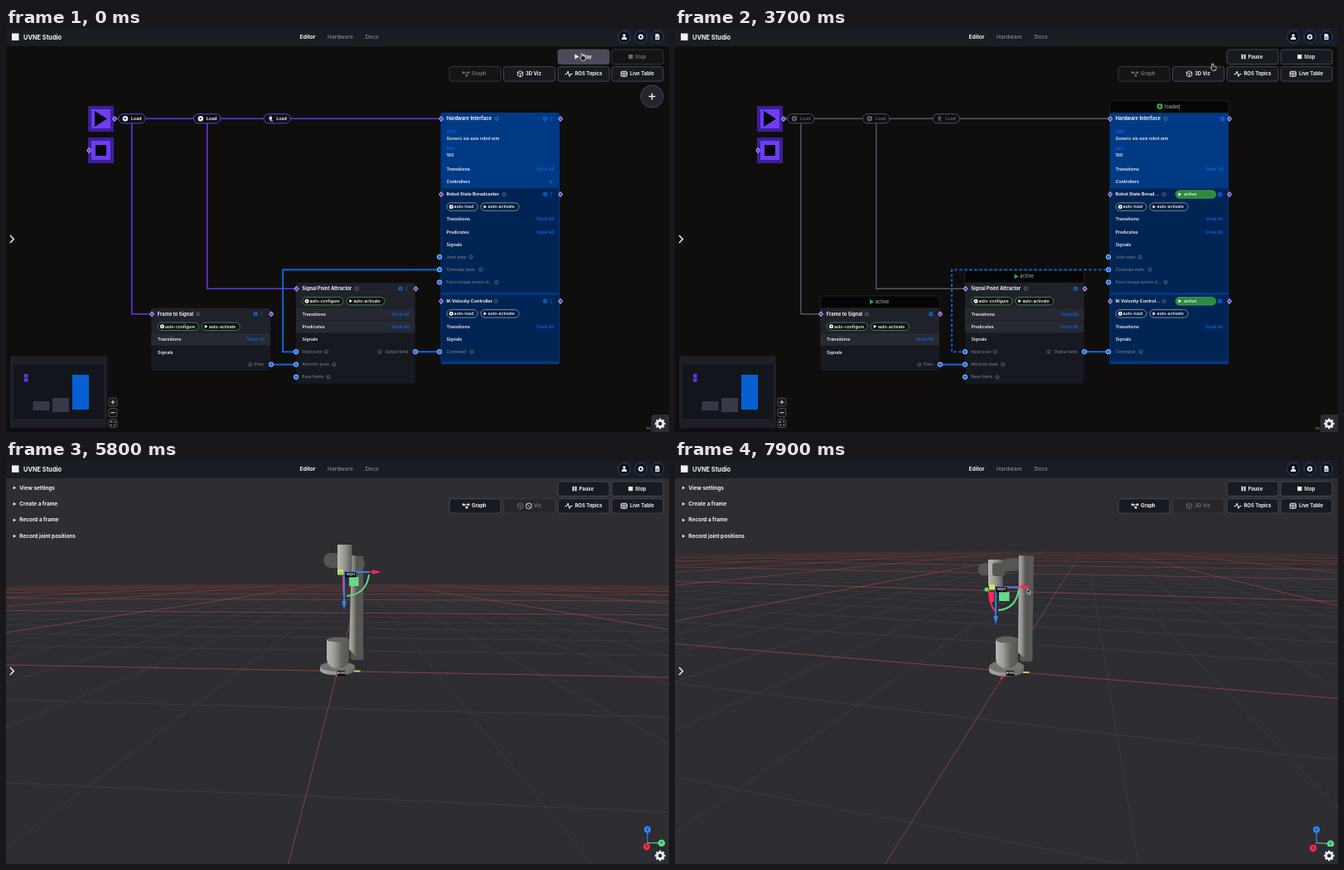
Recreate the animation shown at these times as an HTML page with a canvas. Size 800 by 487 pixels, loop 8000 ms.

```html
<!DOCTYPE html>
<html lang="en">
<head>
<meta charset="utf-8">
<title>Robot editor</title>
<style>
html, body { margin: 0; width: 100%; height: 100%; overflow: hidden; background: #0e0e0e; }
canvas { display: block; width: 100vw; height: 100vh; }
</style>
</head>
<body>
<canvas id="stage"></canvas>
<script>
const W = 800, H = 487, LOOP = 8000;
const canvas = document.getElementById('stage');
const c = canvas.getContext('2d');
const scale = window.devicePixelRatio || 1;
canvas.width = W * scale;
canvas.height = H * scale;

const WHITE = '#f2f2f4', GREY = '#777b85', BLUE = '#0a70f5', LINK = '#0665ea', PURPLE = '#6236ec', GREEN = '#35a047';
const HOVER = '#4b4b58', BUTTON = '#171a20', BORDER = '#4b4e57';

const clamp = v => Math.max(0, Math.min(1, v));
const span = (t, a, b) => clamp((t - a) / (b - a));
const smooth = v => v * v * (3 - 2 * v);
const lerp = (a, b, u) => a + (b - a) * u;

function text(s, x, y, size, color = WHITE, align = 'left', weight = 600) {
  c.font = `${weight} ${size}px Inter, sans-serif`;
  c.textAlign = align;
  c.fillStyle = color;
  c.fillText(s, x, y + size * 0.36);
}
function paint(fill, stroke, width = 1) {
  if (fill) { c.fillStyle = fill; c.fill(); }
  if (stroke) { c.strokeStyle = stroke; c.lineWidth = width; c.stroke(); }
}
function box(x0, y0, x1, y1, r, fill, stroke, width) {
  c.beginPath();
  c.roundRect(x0, y0, x1 - x0, y1 - y0, r);
  paint(fill, stroke, width);
}
function disc(x, y, r, fill, stroke, width) {
  c.beginPath();
  c.arc(x, y, r, 0, 7);
  paint(fill, stroke, width);
}
function trace(points) {
  c.beginPath();
  points.forEach(p => c.lineTo(p[0], p[1]));
}
function line(points, color, width = 1) {
  trace(points);
  paint(null, color, width);
}
function poly(points, fill, stroke, width) {
  trace(points);
  c.closePath();
  paint(fill, stroke, width);
}
const play = (x, y, r, color) => poly([[x - r * .7, y - r], [x + r, y], [x - r * .7, y + r]], color);

function gear(x, y, r, color) {
  disc(x, y, r * .58, null, color, r * .42);
  for (let i = 0; i < 8; i++) {
    const a = i * Math.PI / 4, p = Math.cos(a), q = Math.sin(a);
    line([[x + p * r * .7, y + q * r * .7], [x + p * r, y + q * r]], color, r * .38);
  }
}
function info(x, y) {
  disc(x, y, 2.1, null, '#858993', .6);
  line([[x, y - .4], [x, y + 1.2]], '#858993', .6);
}
function diamond(x, y) {
  poly([[x - 2.3, y], [x, y - 3], [x + 2.6, y], [x, y + 3]], PURPLE, WHITE, .8);
}
function port(x, y) {
  disc(x, y, 2.7, BLUE, '#cfe2ff', .8);
}

/* ---------- top bar and buttons ---------- */

function topBar() {
  box(0, 0, W, 22, 0, '#191d23');
  box(7, 6.5, 15.5, 15, 0, WHITE);
  text('UVNE Studio', 21, 11, 7.4, WHITE, 'left', 700);
  text('Editor', 354.5, 10.5, 6.6, WHITE, 'left', 700);
  text('Hardware', 388, 10.5, 6.6, GREY);
  text('Docs', 433.5, 10.5, 6.6, GREY);
  for (const x of [746, 766, 786]) disc(x, 10.7, 7.2, '#0d1017', '#164a93', 1);
  disc(746, 9, 1.7, WHITE);
  c.beginPath();
  c.arc(746, 14, 3.2, Math.PI, 0);
  paint(WHITE);
  gear(766, 10.7, 3.5, WHITE);
  poly([[783.5, 7], [786.8, 7], [788.5, 8.8], [788.5, 14.3], [783.5, 14.3]], WHITE);
  line([[784.6, 11], [787.4, 11]], '#10131a', .7);
  line([[784.6, 12.7], [787.4, 12.7]], '#10131a', .7);
}

const icons = {
  play: (x, y, k) => play(x, y, 3, k),
  pause: (x, y, k) => { box(x - 2.5, y - 2.8, x - .6, y + 2.8, 0, k); box(x + .6, y - 2.8, x + 2.5, y + 2.8, 0, k); },
  stop: (x, y, k) => box(x - 2.6, y - 2.6, x + 2.6, y + 2.6, 0, k),
  graph: (x, y, k) => {
    line([[x - 2.5, y - 1.5], [x + 2.5, y - 1.5]], k, .8);
    line([[x - 2, y - 1], [x + .8, y + 2]], k, .8);
    for (const [a, b] of [[-3, -1.5], [3, -1.5], [1, 2]]) box(x + a - 1.3, y + b - 1.3, x + a + 1.3, y + b + 1.3, .4, k);
  },
  cube: (x, y, k) => {
    poly([[x, y - 3.6], [x + 3.2, y - 1.9], [x + 3.2, y + 1.9], [x, y + 3.6], [x - 3.2, y + 1.9], [x - 3.2, y - 1.9]], null, k, .9);
    line([[x - 3.2, y - 1.9], [x, y - .2], [x + 3.2, y - 1.9]], k, .8);
    line([[x, y - .2], [x, y + 3.6]], k, .8);
  },
  wave: (x, y, k) => line([[x - 4.5, y + .3], [x - 2.3, y + .3], [x - .9, y - 3.2], [x + .9, y + 3.2], [x + 2, y + .3], [x + 4.5, y + .3]], k, 1),
  table: (x, y, k) => {
    box(x - 3.5, y - 3, x + 3.5, y + 3, .6, null, k, 1);
    line([[x - 3.5, y - 1], [x + 3.5, y - 1]], k, 1);
    line([[x - 3.5, y + 1], [x + 3.5, y + 1]], k, .7);
    line([[x, y - 1], [x, y + 3]], k, .8);
  }
};
function button(x, y, icon, iconX, label, labelX, off, hover) {
  const color = off ? '#6b6d74' : WHITE;
  box(x, y, x + 62, y + 17.5, 3, hover ? HOVER : off ? 'rgba(28,29,34,.4)' : BUTTON, off ? '#393b41' : BORDER, .9);
  icons[icon](iconX, y + 8.6, color);
  text(label, labelX, y + 8.6, 5.9, color, 'left', 700);
}
function buttons(running, viz, hover) {
  if (running) button(666, 26, 'pause', 686, 'Pause', 691.5, false, hover === 'play');
  else button(666, 26, 'play', 688.5, 'Play', 694.5, false, hover === 'play');
  button(731, 26, 'stop', 753.7, 'Stop', 759, !running);
  button(535, 46.7, 'graph', 555, 'Graph', 562, !viz);
  button(600.5, 46.7, 'cube', 620.5, '3D Viz', 627, viz, hover === 'viz');
  button(666, 46.7, 'wave', 679, 'ROS Topics', 686.5);
  button(731, 46.7, 'table', 745.7, 'Live Table', 753);
}
function corners() {
  line([[5, 250], [9.3, 254.5], [5, 259]], WHITE, 1.5);
  box(778.5, 466, 801, 488, [4, 0, 0, 0], '#2b2c34');
  gear(789.3, 477, 6.3, WHITE);
}

/* ---------- node graph ---------- */

function loadPill(x, plug, dim) {
  const color = dim ? '#5c5e69' : WHITE;
  box(x, 103.6, x + 32.3, 114.8, 5.6, '#0e0f15', dim ? '#50525e' : '#5f3ed2', 1);
  if (plug) {
    box(x + 6.5, 107.4, x + 10, 110.6, 1, color);
    line([[x + 7.3, 105.8], [x + 7.3, 108]], color, .7);
    line([[x + 9.3, 105.8], [x + 9.3, 108]], color, .7);
    line([[x + 8.2, 110], [x + 8.2, 112], [x + 11, 112]], color, .9);
  } else {
    disc(x + 8.2, 109.2, 3.2, color);
    play(x + 8.2, 109.2, 1.4, '#0e0f15');
  }
  text('Load', x + 15.3, 109.2, 5.2, color, 'left', 700);
}
function autoPill(x, y, width, label, edge, fill) {
  box(x, y - 4.7, x + width, y + 4.7, 4.7, fill, edge, .9);
  if (label === 'auto-activate') play(x + 5, y, 2.1, WHITE);
  else { disc(x + 5.2, y, 2.5, WHITE); disc(x + 5.2, y, .8, fill); }
  text(label, x + 8.6, y, 5, WHITE, 'left', 600);
}
function row(x, right, y, label, link = true) {
  text(label, x, y, 5.3);
  if (link) text('Show All', right, y, 5, LINK, 'right');
}
function signal(x, y, label, infoX) {
  text(label, x, y, 4.8, GREY, 'left', 500);
  info(infoX, y);
}
function tools(right, y, running) {
  if (running) return gear(right, y, 2.8, BLUE);
  gear(right - 7.5, y, 2.8, BLUE);
  for (const d of [-2, 0, 2]) disc(right, y + d, .65, BLUE);
}
function status(x, y, label) {
  box(x, y, x + 143.7, y + 15, [4, 4, 0, 0], '#050507', '#25262c', .8);
  const loaded = label === 'loaded', mid = x + 71.8, cy = y + 7.2;
  if (loaded) { disc(mid - 11.3, cy, 3.6, GREEN); play(mid - 11.2, cy, 1.5, '#050507'); }
  else play(mid - 10, cy, 3, GREEN);
  text(label, mid - 5.3, cy, 5.7, '#a0a2a8', 'left', 500);
}
function nodeCard(x, y, bottom, title, infoX, rows, running) {
  box(x, y, x + 143.7, bottom, running ? [0, 0, 3, 3] : 3, '#171920');
  box(x, y, x + 143.7, y + 30, running ? 0 : [3, 3, 0, 0], '#20222a');
  rows.forEach((label, i) => {
    box(x, y + 30.3 + i * 15.2, x + 143.7, y + 45 + i * 15.2, 0, '#272932');
    row(x + 7.7, x + 136.5, y + 37.6 + i * 15.2, label);
  });
  text(title, x + 7.5, y + 7, 5.75, WHITE, 'left', 700);
  info(infoX, y + 7);
  tools(x + 133.5, y + 7, running);
  autoPill(x + 8, y + 22, 49, 'auto-configure', '#3f8f48', '#0d1014');
  autoPill(x + 61, y + 22, 46, 'auto-activate', '#3f8f48', '#0d1014');
  row(x + 7.7, 0, y + 37.6 + rows.length * 15.2, 'Signals', false);
  if (running) status(x, y - 15, 'active');
}
function controller(y, bottom, title, short, infoX, running) {
  box(525.5, y - 7.5, 667, bottom, 0, '#002555');
  text(running ? short : title, 531.5, y, 5.35, WHITE, 'left', 700);
  info(running ? 590 : infoX, y);
  tools(running ? 657.5 : 658, y, running);
  if (running) {
    box(604, y - 4.8, 652.5, y + 4.8, 4.8, '#2a8b3c', '#59b567', .6);
    play(609, y, 2.3, WHITE);
    text('active', 614, y, 5.2);
  }
  autoPill(532, y + 15, 37, 'auto-load', '#82a0a8', '#001a40');
  autoPill(573, y + 15, 46, 'auto-activate', '#82a0a8', '#001a40');
}
function hardware(running) {
  box(524.5, 102, 668, 405.3, running ? 0 : 3, '#003a85');
  text('Hardware Interface', 531.5, 109.4, 5.8, WHITE, 'left', 700);
  info(592, 109.4);
  tools(running ? 660.5 : 658, 109.4, running);
  text('URDF', 531.5, 125.5, 4.7, LINK);
  text('Generic six-axis robot arm', 531.5, 132.7, 5);
  text('Rate', 531.5, 145.5, 4.7, LINK);
  text('100', 531.5, 152.7, 5);
  row(531.5, 661, 169.8, 'Transitions');
  row(531.5, 0, 185.2, 'Controllers', false);
  if (!running) {
    line([[654.7, 185.2], [660, 185.2]], LINK, .9);
    line([[657.3, 182.5], [657.3, 188]], LINK, .9);
  }
  controller(200.5, 319, 'Robot State Broadcaster', 'Robot State Broad...', 601, running);
  row(531.5, 661, 230.5, 'Transitions');
  row(531.5, 661, 245.8, 'Predicates');
  row(531.5, 0, 261, 'Signals', false);
  signal(531.5, 276, 'Joint state', 561);
  signal(531.5, 291.2, 'Cartesian state', 573);
  signal(531.5, 306.5, 'Force torque sensor d...', 592);
  controller(329.3, 402, 'IK Velocity Controller', 'IK Velocity Control...', 591, running);
  row(531.5, 661, 360, 'Transitions');
  row(531.5, 0, 375, 'Signals', false);
  signal(531.5, 390.3, 'Command', 562);
  if (running) status(524.5, 87.3, 'loaded');
}
function startIcon(y) {
  box(99, y, 130, y + 31, 0, '#3b1f97');
  box(103, y + 4, 126, y + 27, 0, '#6c3df4');
}
function minimap() {
  box(5, 395, 122, 482.5, 4, '#1c2026');
  box(9, 406, 118, 471, 0, '#12151b');
  box(22, 417, 26.5, 421.3, 0, PURPLE);
  box(22, 422.2, 26.5, 426.5, 0, PURPLE);
  box(32.5, 450, 52.5, 461, 0, '#363948');
  box(56, 446, 76, 463, 0, '#363948');
  box(80, 418, 100, 460, 0, '#0660d2');
  for (const y of [451, 463.7, 476.5]) box(124, y - 5, 134, y + 5, 2, '#14161b', '#55585f', .9);
  line([[126.5, 451], [131.5, 451]], WHITE, .9);
  line([[129, 448.5], [129, 453.5]], WHITE, .9);
  line([[126.5, 463.7], [131.5, 463.7]], WHITE, .9);
  c.setLineDash([2, 2.5]);
  box(126.5, 474.2, 131.5, 478.8, 0, null, WHITE, .8);
  c.setLineDash([]);
}
function graph(t, running, dim) {
  box(0, 22, W, H, 0, '#0f0e0d');
  const wire = dim ? '#555762' : PURPLE, width = dim ? 1.4 : 1.6;
  line([[131, 109.3], [525, 109.3]], wire, width);
  line([[151.8, 109], [151.8, 344.8], [176, 344.8]], wire, width);
  line([[242.8, 109], [242.8, 314.3], [350, 314.3]], wire, width);
  [135.8, 226.6, 311].forEach((x, i) => loadPill(x, i === 2, dim));

  startIcon(94);
  poly([[107, 100], [122, 109.5], [107, 119]], '#050208');
  startIcon(132);
  box(108, 141, 121, 154, 0, '#050208');
  diamond(131, 109.5);
  diamond(100, 147.5);

  nodeCard(175.3, 337.8, 413, 'Frame to Signal', 231.5, ['Transitions'], running);
  text('Pose', 311, 405.7, 4.8, GREY, 'right', 500);
  info(294.7, 405.7);
  nodeCard(349.8, 307.2, 428.7, 'Signal Point Attractor', 423.3, ['Transitions', 'Predicates'], running);
  signal(357.3, 390.3, 'Input pose', 386.3);
  signal(357.3, 405.6, 'Attractor pose', 395.7);
  signal(357.3, 420.7, 'Base frame', 389);
  text('Output twist', 485.5, 390.3, 4.8, GREY, 'right', 500);
  info(450.8, 390.3);
  hardware(running);

  if (running) {
    c.setLineDash([3.2, 2.8]);
    c.lineDashOffset = -t / 500 * 6;
  }
  line([[523, 291.3], [334, 291.3], [334, 390.3], [350, 390.3]], BLUE, 1.7);
  c.setLineDash([]);
  line([[320, 405.6], [350, 405.6]], BLUE, 1.8);
  line([[494, 390.3], [523, 390.3]], BLUE, 1.8);

  for (const y of [109.4, 200.5, 329.4]) { diamond(525, y); diamond(669, y); }
  for (const [x, y] of [[176, 344.8], [350.5, 314.3]]) { diamond(x, y); diamond(x + 144, y); }
  for (const y of [276, 291.3, 306.5, 390.3]) port(523, y);
  for (const y of [390.3, 405.6, 420.7]) port(350, y);
  port(494, 390.3);
  port(320, 405.6);

  minimap();
  if (!running) {
    disc(779.5, 82.5, 13.5, '#22262d', BORDER, .9);
    line([[775.5, 82.5], [783.5, 82.5]], WHITE, 1.4);
    line([[779.5, 78.5], [779.5, 86.5]], WHITE, 1.4);
  }
  text('Re', 773, 483, 4, GREY);
}

/* ---------- 3D view ---------- */

const FOCAL = 393, DIST = 1.667;
const stops = Array.from({ length: 49 }, (_, i) => (i - 24) * .2 * (1 + Math.abs(i - 24) / 4));

function floor(u) {
  const tilt = lerp(.275, .37, u), turn = lerp(.069, .224, u);
  const st = Math.sin(tilt), ct = Math.cos(tilt), sp = Math.sin(turn), cp = Math.cos(turn);
  const project = (a, b) => {
    const far = b * cp - a * sp, depth = DIST + far * ct;
    return [400 + FOCAL * (a * cp + b * sp) / depth, 254.5 - FOCAL * far * st / depth, depth];
  };
  const rules = (gap, reach, color, strength, width) => {
    for (let k = -reach; k <= reach; k += gap) for (const flip of [false, true]) {
      for (let i = 1; i < stops.length; i++) {
        const s0 = stops[i - 1], s1 = stops[i];
        const alpha = strength * (1 - Math.hypot(k, (s0 + s1) / 2) / (reach + 1));
        if (alpha <= 0) continue;
        const p = flip ? project(k, s0) : project(s0, k), q = flip ? project(k, s1) : project(s1, k);
        if (p[2] < .06 || q[2] < .06) continue;
        c.globalAlpha = alpha;
        line([p, q], color, width);
      }
    }
  };
  rules(.5, 12, '#65656c', .36, .7);
  rules(3, 33, '#b8454c', .74, .8);
  c.globalAlpha = 1;
}
function shade(x0, x1, ...colors) {
  const g = c.createLinearGradient(x0, 0, x1, 0);
  colors.forEach((k, i) => g.addColorStop(i / (colors.length - 1), k));
  return g;
}
function robot(u) {
  const m = (a, b) => lerp(a, b, u);
  const metal = shade(379, 421, '#a9a9a5', '#8f8f8b', '#5d5d59');
  const ry = m(6, 7.5);
  c.beginPath();
  c.ellipse(400, 253.5, 21, ry, 0, 0, 7);
  paint(metal);
  box(379, 249, 421, 253.5, 0, metal);
  c.beginPath();
  c.ellipse(400, 249, 21, ry, 0, 0, 7);
  paint('#73736f');
  box(387, 216, 414, 251, [0, 0, 12, 12], shade(387, 414, '#b8b8b4', '#9c9c98', '#62625e', '#555551'));
  c.beginPath();
  c.ellipse(400.5, 216.5, 13.5, m(3, 4), 0, 0, 7);
  paint('#62625e');

  c.lineCap = c.lineJoin = 'round';
  line([[m(392, 373), m(121, 132)], [m(408, 398), m(122, 127)], [424, 125]], '#555551', m(18, 15));
  c.lineCap = 'butt';
  c.lineJoin = 'miter';
  box(416, 224, 431.5, m(241, 243), 3, '#555551');
  poly([[m(417, 415), 115], [m(431, 433), 116], [431, m(240, 242)], [425, m(240, 242)], [414, m(228, 232)]],
    shade(414, 432, '#b2b2ae', '#8f8f8b', '#555551', '#575753', '#595955'));
  const x = m(400, 378);
  box(x, m(102, 120), x + 17.5, m(138, 152), 1, shade(x, x + 18, '#b9b9b5', '#94948f', '#595955'));
  if (u > .5) box(x + 5, 124, x + 20, m(134, 140), 3, `rgba(85,85,81,${u * 2 - 1})`);
}
function tag(x, y, label, width) {
  box(x, y, x + width, y + 6.3, 0, '#0a0a0b');
  text(label, x + width / 2, y + 3, 3.7, WHITE, 'center');
}
function handles(u) {
  const m = (a, b) => lerp(a, b, u);
  const x = m(408, 387), y = m(135, 153), red = '#ff2850', green = '#59dc83', blue = '#2e88ff';
  const end = m(453, 429);
  c.beginPath();
  c.moveTo(x + m(30, 28), y + 3);
  c.quadraticCurveTo(x + m(27, 24), y + 27, x + 3, y + m(29, 28));
  paint(null, green, 2);
  c.beginPath();
  c.moveTo(x - m(1, 8), y + 4);
  c.quadraticCurveTo(x - m(1, 7), y + 25, x, y + 29);
  paint(null, red, 2.2);
  box(x - m(1, 8), y + 6, x - m(0, 2), y + 18, 0, red);
  box(x + m(6, 4), y + 6, x + m(17.5, 16.5), y + 17, 0, '#65d98b');
  line([[x, y], [end - 7, y]], red, 1.6);
  line([[x, y], [x + m(30, 28), y + m(0, 1)]], blue, 1.8);
  poly([[end - 11, y - 2.8], [end, y], [end - 11, y + 2.8]], red);
  line([[x, y], [x, y + 37]], blue, 1.7);
  poly([[x - 2.8, y + 35], [x + 2.8, y + 35], [x, y + 45]], blue);
  box(x - 8, y - 3, x - 1, y + 3.5, 1, '#d8e256');
  disc(x - m(4, 11), y + m(1, 3), m(2, 2.6), green);
  tag(x + m(1, 0), y, 'target', 13.5);

  line([[420, m(254.5, 256)], [427.5, m(254.5, 256)]], '#d9d45a', 1.8);
  line([[m(400, 397), 260], [m(398, 393), m(261, 264)]], red, 1.8);
  tag(399.5, 254, 'world', 10);

  const rx = m(773, 770), ryy = m(466, 468), gy = m(461.7, 462.7);
  line([[774, 461.5], [774, 445.5]], blue, 1.2);
  line([[774, 461.5], [791, gy]], green, 1.2);
  line([[774, 461.5], [rx, ryy]], red, 1.2);
  disc(774, 445.5, 4, blue);
  disc(791, gy, 4.3, green);
  disc(rx, ryy, 4.2, red);
  text('Z', 774, 445.5, 4, '#111', 'center');
  text('Y', 791, gy, 4, '#111', 'center');
  text('X', rx, ryy, 4, '#111', 'center');
}
function viewer(t) {
  const ready = t >= 5800;
  box(0, 22, W, H, 0, ready ? '#2e2d32' : '#020207');
  if (ready) {
    const u = smooth(span(t, 6650, 7850));
    floor(u);
    robot(u);
    handles(u);
    gear(789.3, 477, 6.3, WHITE);
  }
  const items = ['View settings', 'Create a frame', 'Record a frame', 'Record joint positions'];
  items.slice(0, ready ? 4 : 3).forEach((label, i) => {
    const y = 33.3 + i * 19.4;
    play(10.2, y + .3, 2, WHITE);
    text(label, 16.3, y, 6.4, WHITE, 'left', 700);
  });
}

/* ---------- pointer ---------- */

const path = [[0, 695, 34], [2750, 695, 34], [3650, 649, 46], [4500, 632, 54.5], [5750, 632, 54.5],
  [6600, 517, 146], [7400, 464, 165], [7900, 425, 155], [LOOP, 425, 155]];

function pointerAt(t) {
  const i = path.findIndex((p, k) => k && t <= p[0]);
  const a = path[i - 1], b = path[i], u = smooth(span(t, a[0], b[0]));
  return [lerp(a[1], b[1], u), lerp(a[2], b[2], u)];
}
function pointer(t, x, y) {
  c.save();
  c.translate(x, y);
  if (t >= 4600 && t < 5850) {
    disc(0, 0, 3.4, '#202126', '#d5d5d8', 1);
    line([[-2.3, -2.3], [2.3, 2.3]], '#d5d5d8', 1);
  } else if (t < 4600) {
    poly([[-1, -3], [.6, -3], [.8, -.4], [4, .4], [4.3, 2.5], [3.4, 5.2], [-.4, 5.2], [-2.6, 1.8], [-1, 1.6]], '#1b1b1f', '#e4e4e7', .8);
  } else {
    poly([[0, 0], [0, 6.2], [1.5, 5], [2.5, 7.2], [3.5, 6.7], [2.6, 4.6], [4.4, 4.4]], '#111114', '#f0f0f2', .7);
  }
  c.restore();
}

function draw(now) {
  const t = now % LOOP, running = t >= 1900, viz = t >= 5000;
  const [x, y] = pointerAt(t);
  c.setTransform(canvas.width / W, 0, 0, canvas.height / H, 0, 0);
  if (viz) viewer(t);
  else graph(t, running, t >= 2600);
  corners();
  const over = x > 666 && y < 44 ? 'play' : !viz && x < 662 && y > 48 ? 'viz' : '';
  buttons(running, viz, t < 5000 ? over : '');
  topBar();
  pointer(t, x, y);
  requestAnimationFrame(draw);
}
requestAnimationFrame(draw);
</script>
</body>
</html>
```
